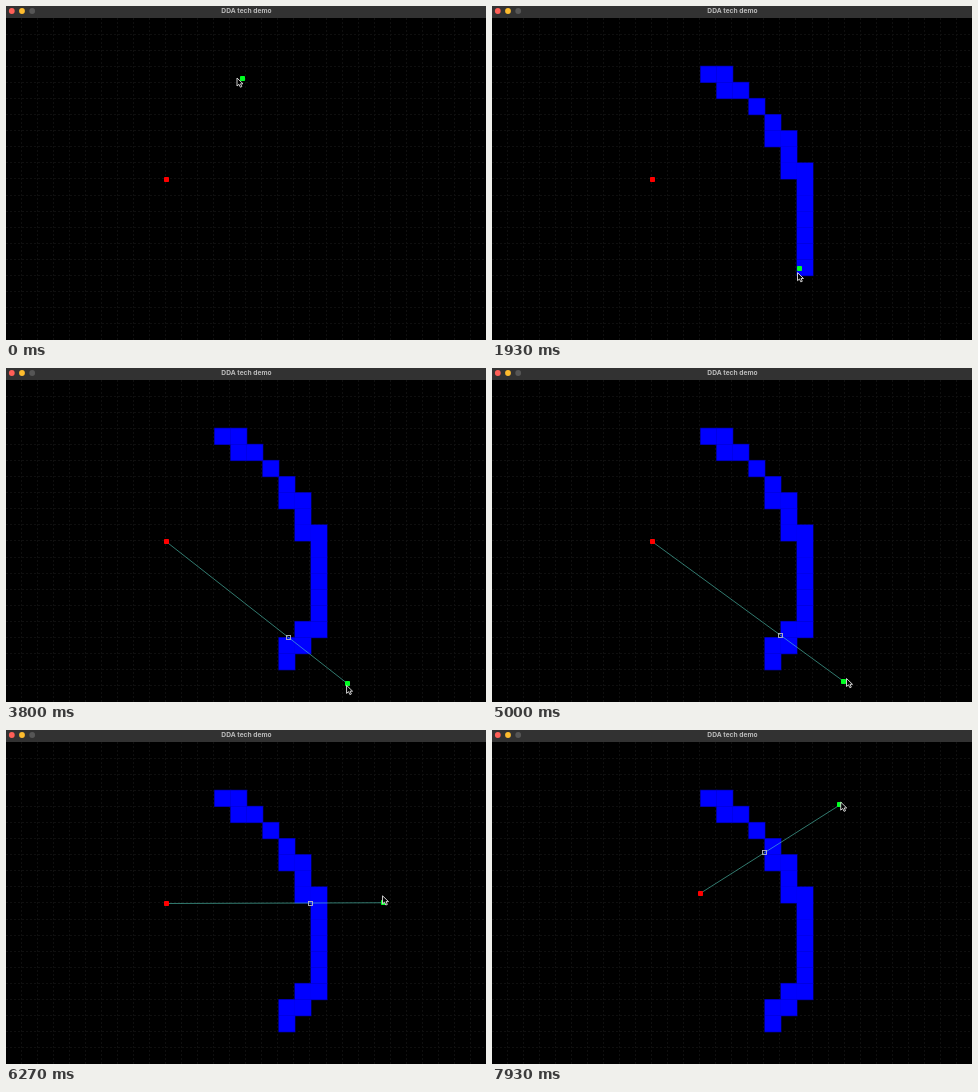
Recreate the animation shown at these times as an HTML page with a canvas. Size 480x334 px, loop 8 s.

```html
<!DOCTYPE html>
<html lang="en">
<head>
<meta charset="utf-8">
<title>DDA tech demo</title>
<style>
  html, body { margin: 0; width: 100%; height: 100%; overflow: hidden; background: #000; }
  canvas { display: block; width: 480px; height: 334px; }
</style>
</head>
<body>
<canvas id="stage" width="480" height="334"></canvas>
<script>
const ctx = document.getElementById('stage').getContext('2d');
const W = 480, H = 334, TOP = 12;
const CW = 16.05, CH = 16.1;
const LOOP = 8000, STEP = LOOP / 120;
const PAINT_START = 200, PAINT_END = 2600, RAY_START = 2870;

// Turning points of the pointer: time, x, y
const mouse = [
  [-70, 236.5, 72.5], [0, 231, 72], [270, 214.5, 69], [600, 237, 79],
  [870, 267, 102], [1330, 301, 158], [1730, 310, 243], [1860, 307.7, 262.5],
  [2600, 280, 290], [3400, 348, 300], [3600, 348, 300], [3740, 341.5, 316],
  [4100, 338, 321], [4600, 340, 321], [5000, 354.5, 310.5], [5400, 375, 266],
  [5800, 380, 222], [6270, 376.5, 165.5], [7060, 358.5, 102],
  [7200, 354, 91], [7560, 345, 86], [8000, 349.5, 69.5]
];

const ramp = (t, a, b) => Math.max(0, Math.min(1, (t - a) / (b - a)));

// Monotone cubic interpolation of one column of a key list
function sample(keys, t, k) {
  const last = keys.length - 1;
  if (t <= keys[0][0]) return keys[0][k];
  if (t >= keys[last][0]) return keys[last][k];
  let i = 0;
  while (keys[i + 1][0] <= t) i++;
  const slope = j => (keys[j + 1][k] - keys[j][k]) / (keys[j + 1][0] - keys[j][0]);
  const tangent = j => {
    if (j === 0) return slope(0);
    if (j === last) return slope(last - 1);
    const a = slope(j - 1), b = slope(j);
    return a * b <= 0 ? 0 : 2 * a * b / (a + b);
  };
  const h = keys[i + 1][0] - keys[i][0];
  const u = (t - keys[i][0]) / h, v = 1 - u;
  return keys[i][k] * (1 + 2 * u) * v * v + tangent(i) * h * u * v * v
    + keys[i + 1][k] * u * u * (3 - 2 * u) - tangent(i + 1) * h * u * u * v;
}

const pointer = t => ({ x: sample(mouse, t, 1), y: sample(mouse, t, 2) });

// The red dot is steered by keys: down, right, up
const origin = t => ({
  x: 160 + 48 * ramp(t, 6850, 7390),
  y: 173.5 + 53.5 * ramp(t, 6280, 6880) - 63.5 * ramp(t, 7200, 7930)
});

// A cell is painted when the pointer passes nearest to its centre
function paintTime(x, y) {
  let best = Infinity, time = 0;
  for (let t = PAINT_START; t <= PAINT_END; t += STEP) {
    const p = pointer(t), d = Math.hypot(p.x - x, p.y - y);
    if (d < best) [best, time] = [d, t];
  }
  return time;
}

// Walk over the grid: R right, L left, D down, X diagonally right and down
function buildWalls(col, row, moves) {
  const cells = [];
  for (const move of ' ' + moves) {
    if ('RX'.includes(move)) col++;
    if (move === 'L') col--;
    if ('DX'.includes(move)) row++;
    const x = col * CW, y = TOP + row * CH;
    cells.push({ x, y, time: paintTime(x + CW / 2, y + CH / 2) });
  }
  return cells;
}

const walls = buildWalls(13, 3, 'RDRXXDRDDRDDDDDDLDLD');

// First point where the ray from p towards q enters a wall
function castRay(p, q) {
  const dx = q.x - p.x || 1e-6, dy = q.y - p.y || 1e-6;
  let best = Infinity;
  for (const { x, y } of walls) {
    const x1 = (x - p.x) / dx, x2 = (x + CW - p.x) / dx;
    const y1 = (y - p.y) / dy, y2 = (y + CH - p.y) / dy;
    const enter = Math.max(Math.min(x1, x2), Math.min(y1, y2));
    const leave = Math.min(Math.max(x1, x2), Math.max(y1, y2));
    if (enter >= 0 && enter <= leave) best = Math.min(best, enter);
  }
  return best < Infinity ? { x: p.x + dx * best, y: p.y + dy * best } : null;
}

function drawGrid() {
  ctx.strokeStyle = '#0f0f0f';
  ctx.lineWidth = 1;
  ctx.setLineDash([2, 2]);
  ctx.beginPath();
  for (let x = CW; x < W; x += CW) {
    ctx.moveTo(Math.floor(x) - 0.5, TOP);
    ctx.lineTo(Math.floor(x) - 0.5, H);
  }
  for (let y = TOP + CH; y < H; y += CH) {
    ctx.moveTo(0, Math.floor(y) + 0.5);
    ctx.lineTo(W, Math.floor(y) + 0.5);
  }
  ctx.stroke();
  ctx.setLineDash([]);
}

function drawWalls(t, color, grow) {
  ctx.fillStyle = color;
  for (const { x, y, time } of walls) {
    if (t >= time) ctx.fillRect(x - grow, y - grow, CW + 2 * grow, CH + 2 * grow);
  }
}

function drawBar() {
  ctx.fillStyle = '#323232';
  ctx.fillRect(0, 0, W, TOP);
  ['#ff5f57', '#febc2e', '#565656'].forEach((color, i) => {
    ctx.fillStyle = color;
    ctx.beginPath();
    ctx.arc(5.8 + i * 10.2, 5, 2.9, 0, Math.PI * 2);
    ctx.fill();
  });
  ctx.fillStyle = '#bcbcbc';
  ctx.font = 'bold 6.7px Inter, "Liberation Sans", sans-serif';
  ctx.textAlign = 'center';
  ctx.fillText('DDA tech demo', 240.5, 7.2);
}

function drawDot(p, color) {
  ctx.fillStyle = color;
  ctx.beginPath();
  ctx.roundRect(Math.round(p.x - 2.5), Math.round(p.y - 2.5), 5, 5, 0.8);
  ctx.fill();
}

function drawRay(p, q) {
  ctx.strokeStyle = 'rgba(90, 220, 200, 0.55)';
  ctx.lineWidth = 1;
  ctx.beginPath();
  ctx.moveTo(p.x, p.y);
  ctx.lineTo(q.x, q.y);
  ctx.stroke();
}

function drawHit(p) {
  ctx.strokeStyle = '#b8b8c4';
  ctx.lineWidth = 0.9;
  ctx.strokeRect(Math.round(p.x - 2.5) + 0.5, Math.round(p.y - 2.5) + 0.5, 4, 4);
}

const arrow = new Path2D('M0 0V8L2 6.3L3.3 9.2L4.8 8.6L3.5 5.8H6Z');

function drawArrow(p) {
  ctx.save();
  ctx.translate(p.x, p.y);
  ctx.fillStyle = '#000';
  ctx.fill(arrow);
  ctx.strokeStyle = '#e4e4e4';
  ctx.lineWidth = 0.9;
  ctx.stroke(arrow);
  ctx.restore();
}

function draw(t) {
  const red = origin(t);
  const green = pointer(t - STEP); // trails the pointer by one step
  const ray = t >= RAY_START;
  ctx.fillStyle = '#000';
  ctx.fillRect(0, 0, W, H);
  drawGrid();
  drawWalls(t, '#000088', 0.6);
  drawWalls(t, '#0000ff', 0);
  drawBar();
  if (ray) drawRay(red, green);
  drawDot(red, '#ff0000');
  drawDot(green, '#00ff22');
  const hit = ray && castRay(red, green);
  if (hit) drawHit(hit);
  drawArrow(pointer(t));
}

function tick() {
  const t = performance.now() % LOOP;
  draw(Math.floor((t + 4) % LOOP / STEP) * STEP);
  requestAnimationFrame(tick);
}
tick();
</script>
</body>
</html>
```
